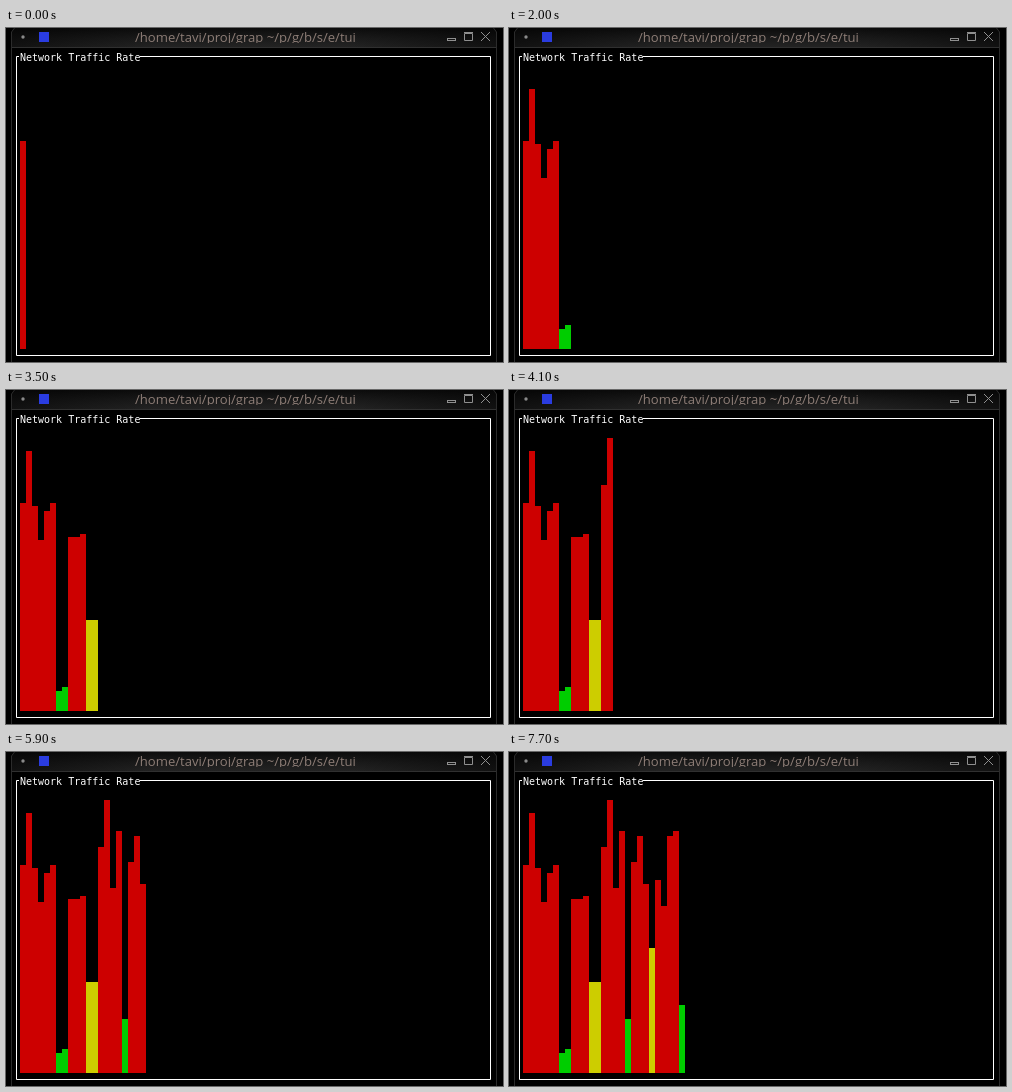
Recreate the animation shown at these times as an HTML page. Size 497 px wide and 334 px high, loop 8 s.

```html
<!DOCTYPE html>
<html lang="en">
<head>
<meta charset="utf-8">
<title>Network Traffic Rate</title>
<style>
  html, body { margin: 0; width: 100%; height: 100%; overflow: hidden; background: #000; }
  svg { display: block; }
  .title { font: 13.1px "Open Sans", "Noto Sans", sans-serif; fill: #8d7d76; }
  .label { font: 10px "DejaVu Sans Mono", "Noto Sans Mono", monospace; fill: #fff; }
</style>
</head>
<body>
<svg width="497" height="334" viewBox="0 0 497 334">
  <defs>
    <linearGradient id="bar" x2="0" y2="1">
      <stop stop-color="#0c0c0c"/>
      <stop offset=".5" stop-color="#1a1a1a"/>
      <stop offset="1" stop-color="#242424"/>
    </linearGradient>
    <linearGradient id="shade">
      <stop stop-color="#000" stop-opacity=".5"/>
      <stop offset=".3" stop-color="#000" stop-opacity="0"/>
      <stop offset=".7" stop-color="#000" stop-opacity="0"/>
      <stop offset="1" stop-color="#000" stop-opacity=".5"/>
    </linearGradient>
    <clipPath id="cut"><path d="M0 0H497V15H0Z"/></clipPath>
  </defs>

  <!-- window frame -->
  <path id="top" d="M6 20V4L9 0H487L490 4V20Z" fill="url(#bar)"/>
  <use href="#top" style="fill:url(#shade)"/>
  <path d="M6 20V4L9 0H487L490 4V20Z" fill="url(#shade)"/>
  <path d="M5.5 334V4L8.5 0M490.5 334V4L487.5 0" fill="none" stroke="#2b2b2b"/>
  <path d="M6 19.5H490" stroke="#303030"/>
  <circle cx="17" cy="9" r="1.7" fill="#8a8a8a"/>
  <rect x="33" y="4" width="10" height="10" fill="#2a3ce0"/>
  <text class="title" x="129" y="14" clip-path="url(#cut)">/home/tavi/proj/grap ~/p/g/b/s/e/tui</text>
  <g fill="none" stroke="#8f8f8f">
    <rect x="441.5" y="10.5" width="8" height="2"/>
    <path d="M458.5 5.5H466.5V12.5H458.5ZM458 4.5H467M475 4L484 13M484 4L475 13"/>
  </g>

  <!-- terminal panel -->
  <path d="M13 28.5H10.5V327.5H484.5V28.5H134" fill="none" stroke="#fff"/>
  <text class="label" x="14" y="33">Network Traffic Rate</text>
  <g id="bars" shape-rendering="crispEdges"></g>
</svg>
<script>
const LOOP = 8000, STEP = 300, LEAD = 100;
const LEFT = 14, BASE = 321, WIDTH = 6;
const heights = [
  208, 260, 205, 171, 200, 208, 20, 24, 174, 174, 177, 91, 91, 226,
  273, 185, 242, 54, 211, 237, 189, 125, 193, 167, 237, 242, 68
];
const color = h => h < 80 ? '#00cd00' : h < 140 ? '#cdcd00' : '#cd0000';

const bars = heights.map((h, i) => {
  const bar = document.createElementNS('http://www.w3.org/2000/svg', 'rect');
  const attrs = { x: LEFT + i * WIDTH, y: BASE - h, width: WIDTH, height: h, fill: color(h) };
  for (const key in attrs) bar.setAttribute(key, attrs[key]);
  return document.getElementById('bars').appendChild(bar);
});

function draw() {
  const time = performance.now() % LOOP;
  const last = Math.floor((time + LEAD) / STEP);
  bars.forEach((bar, i) => bar.style.display = i <= last ? '' : 'none');
  requestAnimationFrame(draw);
}
draw();
</script>
</body>
</html>
```
